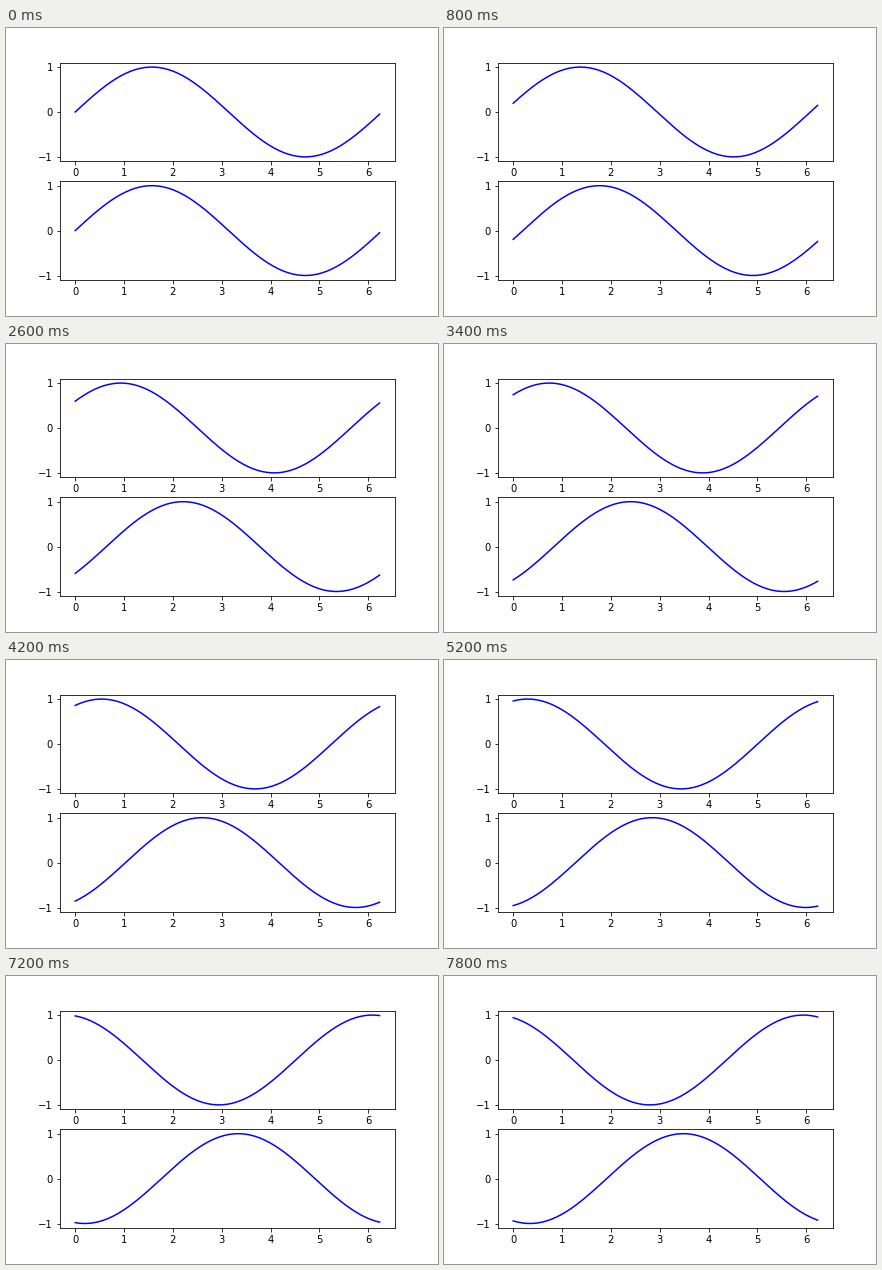
Animation, 432 px wide and 288 px high, one loop 8 s. Source, as a matplotlib script:

```python
import numpy as np
import matplotlib.pyplot as plt
from matplotlib.animation import FuncAnimation

SAMPLES = 128
FRAMES = 40
STEP = 2 * np.pi / SAMPLES  # phase shift per frame

plt.rcParams.update({"font.family": "DejaVu Sans", "font.size": 10})

x = np.arange(SAMPLES) * STEP

fig, axes = plt.subplots(2, 1, figsize=(6, 4), dpi=72, facecolor="white")
fig.subplots_adjust(left=0.125, right=0.9, bottom=0.125, top=0.88, hspace=0.2)
lines = [ax.plot(x, np.sin(x), color="blue", lw=1.5)[0] for ax in axes]


def update(i):
    """Slide the upper wave left and the lower wave right."""
    for line, direction in zip(lines, (1, -1)):
        line.set_ydata(np.sin(x + direction * i * STEP))
    return lines


anim = FuncAnimation(fig, update, frames=FRAMES, interval=200, repeat=True)
plt.show()
```
